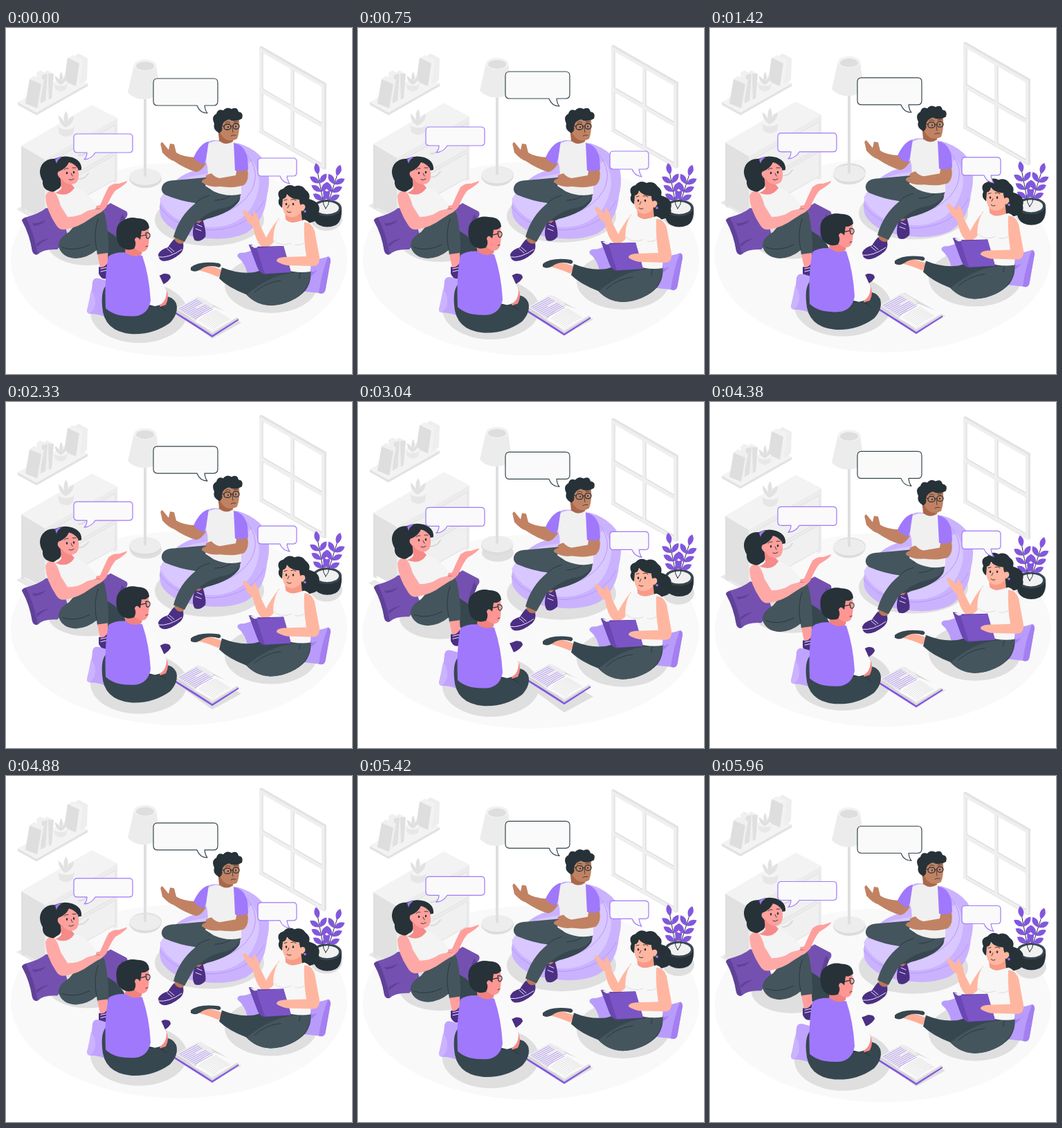
Recreate the animation shown at these times as an HTML page. Size 500 by 500 pixels, loop 6 s.

```html
<!DOCTYPE html>
<html lang="en">
<head>
<meta charset="utf-8">
<title>Group discussion</title>
<style>
html, body { margin: 0; width: 100%; height: 100%; overflow: hidden; background: #fff; }
svg { display: block; width: 100%; height: 100%; }
.line { fill: none; stroke-linecap: round; stroke-linejoin: round; }
.ink { stroke: #263238; }
.bubble { fill: #fafafa; stroke-width: 1.2; stroke-linejoin: round; }
</style>
</head>
<body>
<svg viewBox="0 0 500 500" xmlns="http://www.w3.org/2000/svg">
<!-- data-float: period and delay in ms -->
<g data-float="3000 500">
  <ellipse cx="250" cy="335" rx="243" ry="140" fill="#f9f9f9"/>
</g>

<g id="window" data-float="3000 500">
  <path d="M366 28L369 26L463 80V203L460 205L366 151Z" fill="#e3e3e3"/>
  <path d="M366 28L460 82V204L366 150Z" fill="#efefef"/>
  <path d="M371 36L411 59V111L371 88ZM416 62L456 85V137L416 114ZM371 95L411 118V171L371 148ZM416 121L456 144V196L416 173Z" fill="#fff"/>
  <path d="M371 88L411 111M416 114L456 137M371 148L411 171M416 173L456 196M371 36V88M416 62V114M371 95V148M416 121V173" class="line" stroke="#dedede" stroke-width="1.4"/>
</g>

<g id="shelf" data-float="3000 1500">
  <path d="M17 107L44 122L118 80V84L44 126L17 111Z" fill="#e2e2e2"/>
  <path d="M17 107L91 65L118 80L44 122Z" fill="#f3f3f3"/>
  <path d="M54 66L59 61L69 66L66 101L57 105Z" fill="#f0f0f0"/>
  <path d="M61 66L69 66L66 101L62 104Z" fill="#e0e0e0"/>
  <path d="M44 65L49 61L60 66L57 105L48 110Z" fill="#f0f0f0"/>
  <path d="M52 68L60 66L57 105L50 109Z" fill="#e0e0e0"/>
  <path d="M34 74L40 69L55 75L48 112L44 116Z" fill="#f0f0f0"/>
  <path d="M34 74L51 81L45 116L28 109Z" fill="#dedede"/>
  <path d="M98 41L105 37L118 44L117 75L107 81Z" fill="#eee"/>
  <path d="M90 43L96 39L111 46L107 79L101 84Z" fill="#f2f2f2"/>
  <path d="M89 43L106 51L101 84L84 77Z" fill="#dedede"/>
  <path d="M69 79Q79 74 89 79L87 88Q79 95 71 88Z" fill="#e8e8e8"/>
  <ellipse cx="79" cy="79" rx="10" ry="4.5" fill="#f4f4f4"/>
  <path d="M79 82Q70 77 71 69Q76 72 78 77Q76 68 80 63Q83 70 81 77Q84 70 88 69Q87 79 79 82Z" fill="#e0e0e0"/>
</g>

<g data-float="3000 0" fill="#dfdfdf">
  <path d="M15 262L24 257L58 276L50 282Z" fill="#e9e9e9"/>
  <ellipse cx="202" cy="218" rx="23" ry="13"/>
  <ellipse cx="294" cy="277" rx="79" ry="38"/>
  <ellipse cx="463" cy="276" rx="23" ry="17"/>
  <ellipse cx="118" cy="312" rx="58" ry="31"/>
  <ellipse cx="192" cy="411" rx="70" ry="44"/>
  <ellipse cx="383" cy="371" rx="67" ry="41"/>
  <path d="M246 411L281 392L340 426L298 449Z"/>
</g>

<g id="dresser" data-float="6000 0">
  <path d="M22 170L56 190V282L50 279V273L27 261V265L22 262Z" fill="#e1e1e1"/>
  <path d="M56 190L161 130V222L155 225V221L62 274V282L56 282Z" fill="#ececec"/>
  <path d="M22 170L124 111L161 130L56 190Z" fill="#f3f3f3"/>
  <path d="M61 195L158 140V178L61 233ZM61 238L158 183V219L61 273Z" fill="#f0f0f0" stroke="#e1e1e1"/>
  <path d="M105 184Q113 185 119 176M105 218Q113 219 119 210" class="line" stroke="#d9d9d9" stroke-width="2"/>
  <path d="M75 141Q87 134 99 141L97 153Q87 161 77 153Z" fill="#e6e6e6"/>
  <ellipse cx="87" cy="141" rx="12" ry="5.5" fill="#f4f4f4"/>
  <path d="M86 144Q75 137 76 126Q81 130 84 136Q82 126 87 120Q91 127 89 135Q92 128 98 127Q98 138 86 144Z" fill="#e2e2e2"/>
</g>

<g id="lamp" data-float="6000 0">
  <path d="M178 215V219Q184 231 201 231Q219 230 224 219V215Z" fill="#dcdcdc"/>
  <ellipse cx="201" cy="215" rx="23" ry="12" fill="#ededed"/>
  <path d="M199 98H203V214Q201 216 199 214Z" fill="#dfdfdf"/>
  <path d="M185 53L176 93Q185 103 200 103Q216 102 222 93L217 53Z" fill="#ececec"/>
  <ellipse cx="201" cy="54" rx="16" ry="8.5" fill="#f2f2f2"/>
  <ellipse cx="201" cy="55" rx="13" ry="6.2" fill="#dedede"/>
</g>

<g id="plant" data-float="3000 1000">
  <path d="M443 260Q442 280 453 285Q464 290 476 285Q486 280 485 260Z" fill="#263238"/>
  <ellipse cx="464" cy="260" rx="21" ry="12" fill="#37474f"/>
  <ellipse cx="464" cy="260" rx="17" ry="9" fill="#f1f1f1"/>
  <g id="leaves" fill="#8257dc"></g>
</g>

<g id="seated-man" data-float="3000 1000">
  <path d="M279 194Q283 164 299 162Q350 162 372 190Q385 210 377 243Q374 280 346 297Q322 307 292 304Q240 301 224 273Q217 249 235 231Q250 211 279 204Z" fill="#cab2ff"/>
  <path d="M222 248Q238 216 290 211Q334 206 356 192Q372 216 362 244Q348 284 302 288Q240 288 222 248Z" fill="#d9c7ff"/>
  <path d="M222 258Q244 291 299 292Q353 288 373 250M346 181Q370 207 354 236Q341 258 312 268" class="line" stroke="#b798f5" stroke-width="1"/>
  <path d="M271 278L286 269L284 288L272 285Z" fill="#b97759"/>
  <path d="M273 280Q280 285 284 276Q290 295 288 302Q281 310 273 307Q267 299 273 280Z" fill="#4b2f83"/>
  <path d="M244 300L258 306L255 315L243 311Z" fill="#b97759"/>
  <path d="M220 327Q223 320 234 317Q239 309 243 305Q248 314 256 311Q258 320 252 326Q239 337 228 337Q220 336 220 327Z" fill="#4b2f83"/>
  <path d="M220 331Q235 333 254 320M236 317L243 323M233 319L240 325M276 284L283 287M274 290L282 293" class="line" stroke="#f0e9ff" stroke-width="1"/>
  <path d="M291 213L333 236Q341 241 337 250Q326 267 290 276L286 278L268 279L280 250Z" fill="#37474f"/>
  <path d="M225 231Q227 220 245 220L289 216L340 239Q334 258 309 261Q288 267 272 284L258 309L242 302Q250 272 274 253Q251 250 230 241Q224 237 225 231Z" fill="#44555d"/>
  <path d="M274 253Q281 245 294 242M291 217Q300 227 294 235M325 242Q315 249 302 249" class="line ink" stroke-width=".8"/>
  <path d="M291 168Q300 162 309 164L328 163Q337 168 340 178L340 240Q320 245 300 236L288 228Q295 210 289 192Z" fill="#f0f0f0"/>
  <path d="M274 187Q255 186 246 180L243 168L237 167L235 176L226 165Q222 166 224 171L226 180Q235 190 242 192Q260 204 275 208Q282 207 289 196Z" fill="#c18263"/>
  <path d="M271 187Q281 166 293 164L289 190L286 197Q277 195 271 187Z" fill="#a078fc"/>
  <path d="M334 201L349 204Q352 220 344 227Q330 232 309 229Q294 231 283 223Q282 219 290 217Q285 213 297 210Q302 216 309 217L332 213Z" fill="#c18263"/>
  <path d="M329 166Q345 169 349 188L350 204Q341 209 331 206Z" fill="#a078fc"/>
  <path d="M306 143L308 163Q318 171 328 164V158L318 146Z" fill="#a9674c"/>
  <path d="M306 138Q309 128 320 128L337 132Q338 150 334 160Q328 164 320 162Q309 158 306 138Z" fill="#c18263"/>
  <path d="M304 149Q299 145 301 138Q296 128 304 124Q306 116 314 119Q319 113 326 117Q334 113 336 121Q344 122 341 131Q331 137 322 132Q314 134 312 142Q314 149 308 152Z" fill="#263238"/>
  <g class="line ink">
    <rect x="315" y="139" width="10" height="8" rx="4" stroke-width="1.3"/>
    <rect x="328" y="138" width="9" height="8" rx="4" stroke-width="1.3"/>
    <path d="M307 140L315 142M325 142H328" stroke-width="1.1"/>
    <path d="M317 137Q320 134 324 137M329 136L335 135M325 156Q328 154 332 155M327 144L328 151" stroke-width=".8"/>
    <path d="M321 143V143.5M332 142V142.5" stroke-width="2"/>
  </g>
</g>

<g id="left-woman" data-float="3000 1500">
  <path d="M24 280Q21 277 27 274Q49 268 58 260Q65 261 80 268L90 302L74 320Q54 319 46 327Q40 329 38 322Q34 298 24 280Z" fill="#7451b0"/>
  <path d="M24 280Q34 298 38 322Q40 329 46 327Q41 298 29 274Q21 276 24 280ZM58 277Q48 283 38 282L40 286Q53 285 58 277ZM63 304Q52 305 44 312L45 316Q53 308 63 304Z" fill="#5f4298"/>
  <path d="M112 262Q140 261 151 253L174 265Q178 269 172 276Q166 289 165 307L140 308Z" fill="#7451b0"/>
  <path d="M172 276Q166 289 165 305L159 302Q161 285 168 269Z" fill="#5f4298"/>
  <path d="M139 290Q158 297 169 313L182 337L160 343L139 330Z" fill="#37474f"/>
  <path d="M205 360Q219 360 228 355Q238 354 238 361Q232 371 216 374L206 370Z" fill="#4b2f83"/>
  <path d="M115 249Q126 259 136 256Q143 240 148 230Q155 224 163 225L175 221Q176 223 166 230L158 235Q152 242 145 259Q137 269 126 270Z" fill="#ff9f9d"/>
  <path d="M66 237Q80 242 98 230Q117 236 131 256Q127 275 104 285L77 286Z" fill="#f4f4f4"/>
  <path d="M76 316Q75 304 91 295Q107 275 123 264Q138 256 143 270Q149 300 148 326L132 328L131 321Q118 332 101 333Q81 332 76 316Z" fill="#44555d"/>
  <path d="M131 321Q126 296 133 276M81 317Q99 324 121 313" class="line ink" stroke-width=".8"/>
  <path d="M57 243Q60 234 68 235Q75 241 79 257L89 273Q105 273 116 265Q127 260 139 262Q142 265 132 269L121 276Q105 288 86 291Q77 293 72 284Q58 263 57 243Z" fill="#ffa9a6"/>
  <path d="M132 327L147 325L148 344L136 346Z" fill="#ff9f9d"/>
  <path d="M134 345Q142 348 147 339Q151 352 147 361Q139 366 134 355Z" fill="#4b2f83"/>
  <path d="M137 348L146 346M137 352L146 350" class="line" stroke="#f0e9ff"/>
  <path d="M64 236Q52 233 53 221Q45 207 53 196Q60 188 70 189Q83 183 96 187Q110 192 109 205L88 209L79 216Q83 230 73 234Q69 238 64 236Z" fill="#263238"/>
  <path d="M78 211L80 232Q76 237 71 238Q89 246 99 231L93 224Z" fill="#f58a88"/>
  <path d="M77 207Q87 203 91 194Q99 196 104 203Q107 217 102 223Q95 229 87 224Q79 220 77 207Z" fill="#ffa09d"/>
  <path d="M79 218Q72 212 76 207Q82 206 82 213Z" fill="#ffa09d"/>
  <path d="M71 190Q76 186 80 187Q74 191 73 196Z" fill="#a078fc"/>
  <g class="line ink">
    <path d="M88 209V210M98 208V209" stroke-width="2.4"/>
    <path d="M84 205Q86 202 90 203M96 202L101 202M91 219Q94 221 98 218M94 210L96 214" stroke-width=".9"/>
  </g>
</g>

<g id="right-woman" data-float="3000 0">
  <path d="M335 331Q333 327 338 325Q352 325 365 315L398 328L390 360L349 356Q346 340 335 331Z" fill="#b99bfb"/>
  <path d="M425 334Q447 337 466 330Q471 332 468 342L462 376Q461 386 452 383L414 379Z" fill="#b99bfb"/>
  <path d="M465 331Q456 354 452 383Q461 386 462 376L468 342Q471 332 465 331ZM450 350Q441 354 435 352L442 358Z" fill="#a37ff0"/>
  <path d="M279 341Q300 344 313 350L307 360Q291 353 278 350Z" fill="#ffae98"/>
  <path d="M267 346Q279 336 308 340Q313 343 308 346Q292 341 281 349Q273 354 267 350Z" fill="#37474f"/>
  <path d="M312 346Q336 356 359 353L393 343L439 344Q444 363 433 379Q415 399 382 401Q360 399 347 385Q321 375 308 362Z" fill="#37474f"/>
  <path d="M348 385Q382 357 414 354L440 347Q442 371 424 386Q405 401 382 401Q360 400 348 385Z" fill="#44555d"/>
  <path d="M430 350Q423 354 424 362M359 382Q376 367 397 365" class="line ink" stroke-width=".8"/>
  <path d="M428 237Q441 235 438 247Q456 252 452 266Q455 278 441 281Q432 285 426 278L417 245Z" fill="#263238"/>
  <path d="M395 274Q381 292 376 303L367 285Q366 273 358 264L357 273L345 263Q341 263 343 268L350 281L357 287Q360 306 369 316Q377 322 390 306Z" fill="#ffb6a0"/>
  <path d="M403 264L404 277Q414 285 428 279L426 258Z" fill="#f79b88"/>
  <path d="M393 277Q398 275 402 274Q408 284 421 280L431 277Q442 280 443 295L440 352Q422 355 402 349Q391 340 387 316Q384 294 393 277Z" fill="#f7f7f7"/>
  <path d="M387 307Q398 317 412 311M418 313Q426 315 432 310" class="line" stroke="#d8d8d8" stroke-width=".9"/>
  <path d="M351 313L355 313L362 316L401 315L412 353L373 356Q366 354 363 345Z" fill="#5e3ea2"/>
  <path d="M359 318L401 315L412 353L374 355Z" fill="#7b55c5"/>
  <path d="M351 313Q358 313 362 318L374 355Q366 354 363 345Z" fill="#6a47b3"/>
  <path d="M353 314Q360 313 364 317L359 318Z" fill="#eee"/>
  <path d="M431 281Q441 280 446 293L453 331Q454 344 443 344L406 343Q397 341 391 337Q390 332 402 331L434 330Q430 306 431 281Z" fill="#ffb6a0"/>
  <path d="M400 246Q410 237 424 243Q432 256 425 268Q415 277 405 271Q397 263 400 246Z" fill="#ffb6a0"/>
  <path d="M399 260Q391 254 395 246Q390 235 401 232Q408 224 417 229Q427 225 433 234Q441 239 436 249Q441 257 435 262Q424 260 424 248Q411 247 406 240Q405 246 400 247Z" fill="#263238"/>
  <path d="M425 260Q425 253 431 255Q435 260 428 265Z" fill="#ffb6a0"/>
  <circle cx="432" cy="265" r="1.8" fill="#a078fc"/>
  <g class="line ink">
    <path d="M405 254V255M415 254V255" stroke-width="2.4"/>
    <path d="M402 249L406 248M412 248Q416 246 419 249M406 265Q409 268 412 266M409 256L407 260" stroke-width=".9"/>
  </g>
</g>

<g id="open-book" data-float="6000 0">
  <path d="M243 409L298 443L336 420V422.5L298 447L243 412Z" fill="#8358e2"/>
  <path d="M244 408L279 389L336 420L298 444Z" fill="#d6d6d6"/>
  <path d="M245 406L277 388Q292 392 301 403L335 418L298 441Q285 430 272 424Q258 412 245 406Z" fill="#ededed"/>
  <path d="M272 424Q284 408 301 403L335 417L298 438Z" fill="#fafafa"/>
  <path d="M272 424Q284 408 301 403" class="line" stroke="#d2d2d2"/>
  <g id="text-lines" class="line"></g>
</g>

<g id="back-man" data-float="3000 500">
  <path d="M121 413Q115 412 118 404Q124 384 125 367Q127 360 135 362L152 367L151 421Q137 413 121 413Z" fill="#c0a3ff"/>
  <path d="M123 379Q130 388 129 399Q128 408 121 413Q115 412 118 404Z" fill="#ccb3ff"/>
  <path d="M146 371Q137 378 139 402Q141 438 180 442Q212 444 237 426Q250 412 246 398Q240 386 226 388L205 400Z" fill="#37474f"/>
  <path d="M207 402Q222 399 232 409" class="line ink"/>
  <path d="M226 376L231 377Q237 388 231 400L222 403Z" fill="#f58a88"/>
  <path d="M196 330Q211 331 216 345L232 380Q232 400 215 402L207 400L199 358Z" fill="#fafafa"/>
  <path d="M154 328Q147 331 146 344L149 360L158 350Z" fill="#fafafa"/>
  <path d="M148 330Q163 319 197 329Q207 358 209 394Q206 412 190 416Q159 419 144 405Q142 360 148 330Z" fill="#a078fc"/>
  <path d="M174 310L172 324Q186 334 196 327L198 314Z" fill="#f0827f"/>
  <path d="M187 292L206 290Q208 305 205 317Q202 325 193 323L182 316Z" fill="#ff9693"/>
  <path d="M160 303Q157 285 168 279Q178 272 190 275Q206 275 207 289Q202 294 196 293L194 306Q188 299 186 306Q189 312 185 319Q175 323 166 316Q161 312 160 303Z" fill="#263238"/>
  <path d="M187 309Q185 303 191 303Q194 310 190 314Z" fill="#ff9693"/>
  <path d="M193 301L202 299M202 296Q209 295 208 301Q206 306 203 303Z" class="line ink" stroke-width="1.2"/>
  <path d="M202 316L205 315" class="line ink" stroke-width=".9"/>
</g>

<g id="bubbles" data-float="1500 0" class="bubble">
  <path d="M219 73H300Q306 73 306 79V106Q306 112 300 112H287Q288 120 291 123Q280 123 276 112H219Q213 112 213 106V79Q213 73 219 73Z" stroke="#37474f"/>
  <path d="M103 153H178Q183 153 183 158V175Q183 180 178 180H129Q124 189 113 190Q117 186 117 180H103Q98 180 98 175V158Q98 153 103 153Z" stroke="#a078fc"/>
  <path d="M369 188H415Q420 188 420 193V209Q420 214 415 214H406Q407 221 410 225Q399 223 396 214H369Q364 214 364 209V193Q364 188 369 188Z" stroke="#a078fc"/>
</g>
</svg>
<script>
const LOOP = 6000, RISE = 10;
const byId = id => document.getElementById(id);

// Leaves sit in pairs along a stem, with one at its tip.
function sprig(x0, y0, x1, y1, pairs, size) {
  const lean = Math.atan2(x1 - x0, y0 - y1) * 180 / Math.PI;
  const leaf = (x, y, turn) =>
    `<path transform="translate(${x} ${y}) rotate(${turn})" d="M0 0Q${-size * .46} ${-size * .55} 0 ${-size}Q${size * .46} ${-size * .55} 0 0"/>`;
  let out = `<path d="M462 261Q${x0} ${y0 + 6} ${x0} ${y0}L${x1} ${y1}" class="line ink"/>` + leaf(x1, y1, lean);
  for (let i = 0; i < pairs; i++) {
    const k = i / pairs, x = x0 + (x1 - x0) * k, y = y0 + (y1 - y0) * k;
    out += leaf(x, y, lean - 46) + leaf(x, y, lean + 46);
  }
  return out;
}
byId("leaves").innerHTML =
  sprig(458, 249, 451, 212, 3, 17) + sprig(467, 249, 478, 214, 3, 17);

let lines = "";
for (let i = 0; i < 10; i++) {
  const x = 250 + i * 2.5, y = 406 + i * 1.6;
  const length = i === 4 ? 14 : 26;
  lines += `<path d="M${x} ${y}l${length} ${-length * .54}" stroke="#b79bf7" stroke-width="1"/>`;
  lines += `<path d="M${279 + i * 2.2} ${423 + i * 1.4}q12 -11 25 -15" stroke="#d6d6d6" stroke-width=".7"/>`;
}
byId("text-lines").innerHTML = lines;

const floaters = [...document.querySelectorAll("[data-float]")].map(node => {
  const [period, delay] = node.dataset.float.split(" ").map(Number);
  return { node, period, delay };
});

function draw(time) {
  for (const { node, period, delay } of floaters) {
    const phase = Math.max(0, time - delay) % period / period;
    const y = -RISE * (1 - Math.abs(1 - 2 * phase));
    node.setAttribute("transform", `translate(0 ${y.toFixed(3)})`);
  }
}

const start = performance.now();
function tick() {
  draw((performance.now() - start) % LOOP);
  requestAnimationFrame(tick);
}
tick();
</script>
</body>
</html>
```
